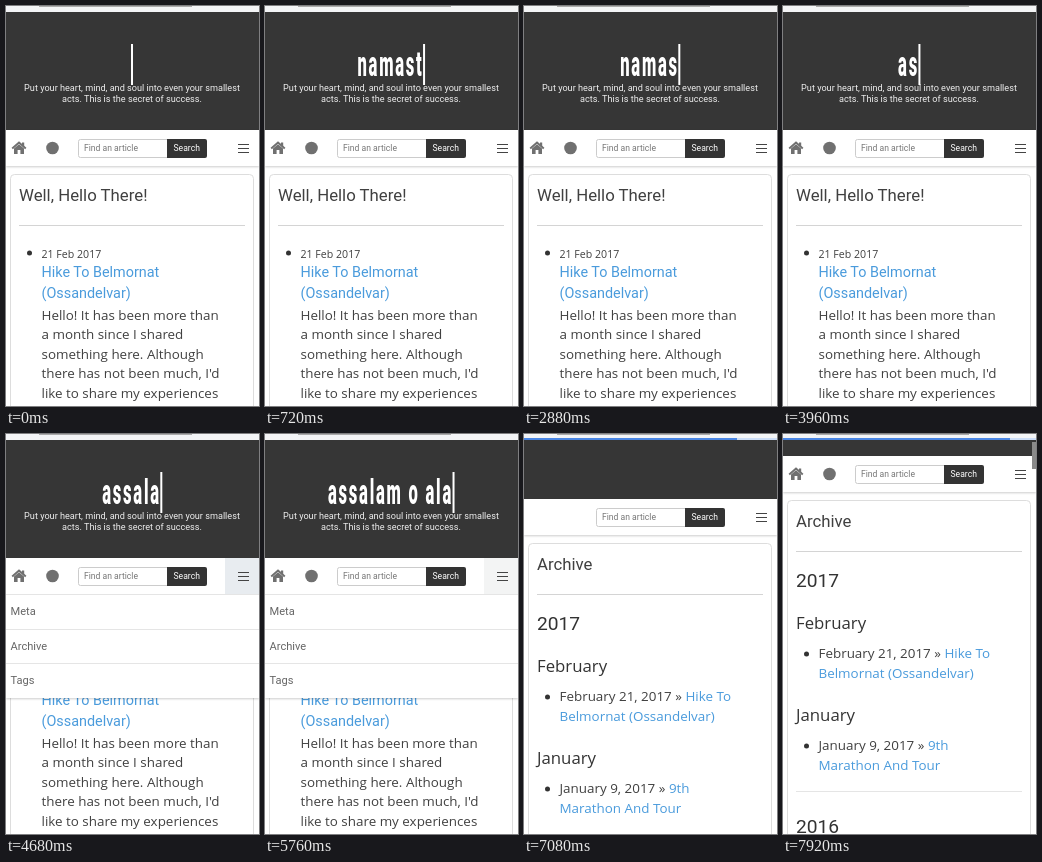
Write an HTML page that moves like this. It is 253 px wide and 400 px high and loops after 8 s.

```html
<!DOCTYPE html>
<html lang="en">
<head>
<meta charset="utf-8">
<title>Blog walk-through</title>
<style>
  html, body { margin: 0; height: 100%; overflow: hidden; background: #fff; }
  svg { display: block; width: 100vw; height: 100vh; }
  text { font-family: Roboto, sans-serif; fill: #404040; white-space: pre; }
  .os { font-family: "Open Sans", sans-serif; }
  .body { font-size: 13.42px; }
  .h1 { font-size: 16.8px; }
  .h2 { font-size: 19.2px; fill: #333; }
  .h3 { font-size: 16.8px; fill: #333; }
  .link { fill: #4a9bdc; }
  .tag { font-size: 9.13px; fill: #eee; text-anchor: middle; }
  .small { font-size: 8.6px; }
  .item { font-size: 11.1px; fill: #666; }
  .dot { fill: #333; }
  .rule { stroke: #d4d4d4; }
  .card { fill: #fff; stroke: #ddd; }
  #word { font-size: 35px; font-weight: 900; letter-spacing: 3.7px; fill: #fff; }
</style>
</head>
<body>
<svg viewBox="0 0 253 400">
  <defs>
    <filter id="shadow" x="-10%" y="-20%" width="120%" height="160%">
      <feDropShadow dx="0" dy="1" stdDeviation="1" flood-opacity=".2"/>
    </filter>
    <clipPath id="menuClip"><rect id="menuBox" y="36" width="253" height="0"/></clipPath>
  </defs>
  <rect width="253" height="400" fill="#fff"/>
  <rect id="header" y="6" width="253" fill="#363636"/>

  <g id="hero">
    <text class="tag" x="126" y="85">Put your heart, mind, and soul into even your smallest</text>
    <text class="tag" x="126" y="95.5">acts. This is the secret of success.</text>
    <text id="word"></text>
    <rect id="caret" y="38" width="2" height="41" fill="#fff"/>
  </g>

  <g id="home" transform="translate(0 124)">
    <rect class="card" x="4.5" y="44.5" width="243" height="300" rx="4"/>
    <text class="h1" x="13" y="70.7">Well, Hello There!</text>
    <path class="rule" d="M13 95.5H239"/>
    <circle class="dot" cx="23.5" cy="123" r="2.5"/>
    <text class="os" x="35.5" y="127.5" font-size="10.6">21 Feb 2017</text>
    <g font-size="14.4">
      <text class="link" x="35.5" y="147">Hike To Belmornat</text>
      <text class="link" x="35.5" y="168">(Ossandelvar)</text>
    </g>
    <g id="intro"></g>
  </g>

  <g id="archive">
    <rect class="card" x="4.5" y="44.5" width="243" height="500" rx="4"/>
    <text class="h1" x="13" y="70.7">Archive</text>
    <path class="rule" d="M13 95.5H239"/>
    <text class="h2" x="13" y="130.5">2017</text>
    <text class="h3 os" x="13" y="173">February</text>
    <circle class="dot" cx="23.5" cy="198" r="2.5"/>
    <text class="os body" x="35.5" y="202">February 21, 2017 » <tspan class="link">Hike To</tspan></text>
    <text class="os body link" x="35.5" y="221.7">Belmornat (Ossandelvar)</text>
    <text class="h3 os" x="13" y="265">January</text>
    <circle class="dot" cx="23.5" cy="290" r="2.5"/>
    <text class="os body" x="35.5" y="294">January 9, 2017 » <tspan class="link">9th</tspan></text>
    <text class="os body link" x="35.5" y="313.7">Marathon And Tour</text>
    <path class="rule" d="M13 335.5H239" opacity=".6"/>
    <text class="h2" x="13" y="376.5">2016</text>
  </g>

  <g id="nav">
    <rect width="253" height="36" fill="#fff" filter="url(#shadow)"/>
    <g id="menu" clip-path="url(#menuClip)">
      <rect y="20" width="253" height="120" fill="#fff" filter="url(#shadow)"/>
      <path class="rule" d="M0 36.5H253M0 71.5H253M0 105.5H253" opacity=".6"/>
      <text class="item" x="4.5" y="57">Meta</text>
      <text class="item" x="4.5" y="91.7">Archive</text>
      <text class="item" x="4.5" y="126">Tags</text>
    </g>
    <rect id="hover" x="219" width="34" height="36"/>
    <g id="icons" fill="#707070">
      <path d="M6.2 18.4L13 12.6L19.8 18.4" fill="none" stroke="#707070" stroke-width="2"/>
      <path d="M8 18.6L13 14.3L18 18.6V24H14.4V20H11.6V24H8ZM16 12.6H18.2V17L16 15.2Z"/>
      <circle cx="46.5" cy="18" r="6.3"/>
    </g>
    <rect x="72.5" y="9.5" width="92" height="18" rx="2" fill="#fff" stroke="#ccc"/>
    <path d="M161 9H199Q201 9 201 11V26Q201 28 199 28H161Z" fill="#333"/>
    <text class="small" x="78" y="21" style="fill:#777">Find an article</text>
    <text class="small" x="167.5" y="21" style="fill:#fff">Search</text>
    <path d="M232 14.5H243M232 18.5H243M232 22.5H243" stroke="#444"/>
  </g>

  <rect id="thumb" x="249" y="8" width="4" height="27" fill="#8a8a8a"/>
  <rect width="253" height="6" fill="#f3f4f6"/>
  <path d="M33 .3H186" stroke="#aaa" stroke-width="1.2"/>
  <g id="loading">
    <rect y="4" width="253" height="2" fill="#cbdcf6"/>
    <rect id="bar" y="4" height="2" fill="#4a86e4"/>
  </g>
</svg>
<script>
const $ = id => document.getElementById(id);
const set = (id, name, value) => $(id).setAttribute(name, value);
const show = (id, on) => set(id, "visibility", on ? "visible" : "hidden");
const clamp = x => Math.max(0, Math.min(1, x));

const LOOP = 8000, STEP = 120, CONDENSE = .475;
const HELLO = "namaste", GREETING = "assalam o alaikum";
// Steps at which each letter of the greeting is typed
const KEYS = [32, 33, 34, 35, 37, 38, 40, 41, 42, 44, 45, 46, 47, 49, 50, 51, 52];

$("intro").innerHTML = [
  "Hello! It has been more than", "a month since I shared", "something here. Although",
  "there has not been much, I'd", "like to share my experiences"
].map((s, i) => `<text class="os body" x="35.5" y="${189.5 + i * 19.6}">${s}</text>`).join("");

function typed(step) {
  if (step < 24) return HELLO.slice(0, step);
  if (step < 32) return HELLO.slice(0, Math.max(0, 29 - step));
  return GREETING.slice(0, KEYS.filter(k => k <= step).length);
}

function drawWord(step) {
  const word = $("word");
  word.textContent = typed(step);
  const width = word.textContent ? word.getComputedTextLength() * CONDENSE : 0;
  set("word", "transform", `translate(${125.5 - width / 2} 70) scale(${CONDENSE} 1)`);
  set("caret", "x", 125 + width / 2);
}

function progress(t) {
  if (t <= 7080) return 25 + 188 * clamp((t - 6120) / 960);
  return 213 + 14 * clamp((t - 7080) / 360);
}

function draw(time) {
  const step = Math.floor(time % LOOP / STEP), t = step * STEP;
  const onArchive = t >= 6720, scrolled = t >= 7920;
  const menuOpen = t >= 4440 && !onArchive;
  const navY = scrolled ? 22 : onArchive ? 65 : 124;

  for (const id of ["hero", "home"]) show(id, !onArchive);
  show("archive", onArchive);
  show("icons", !onArchive || t >= 7200);
  show("thumb", scrolled);
  show("loading", t >= 6120);
  show("menu", menuOpen);
  show("hover", menuOpen);

  set("header", "height", navY - 6);
  set("nav", "transform", `translate(0 ${navY})`);
  set("archive", "transform", `translate(0 ${navY})`);
  set("hover", "fill", t < 5160 ? "#e8ecf0" : "#f3f4f4");
  set("menuBox", "height", 110 * clamp((t - 4440) / 240));
  set("bar", "width", progress(t));
  drawWord(step);
  requestAnimationFrame(frame);
}

const start = performance.now();
const frame = () => draw(performance.now() - start);
frame();
</script>
</body>
</html>
```
